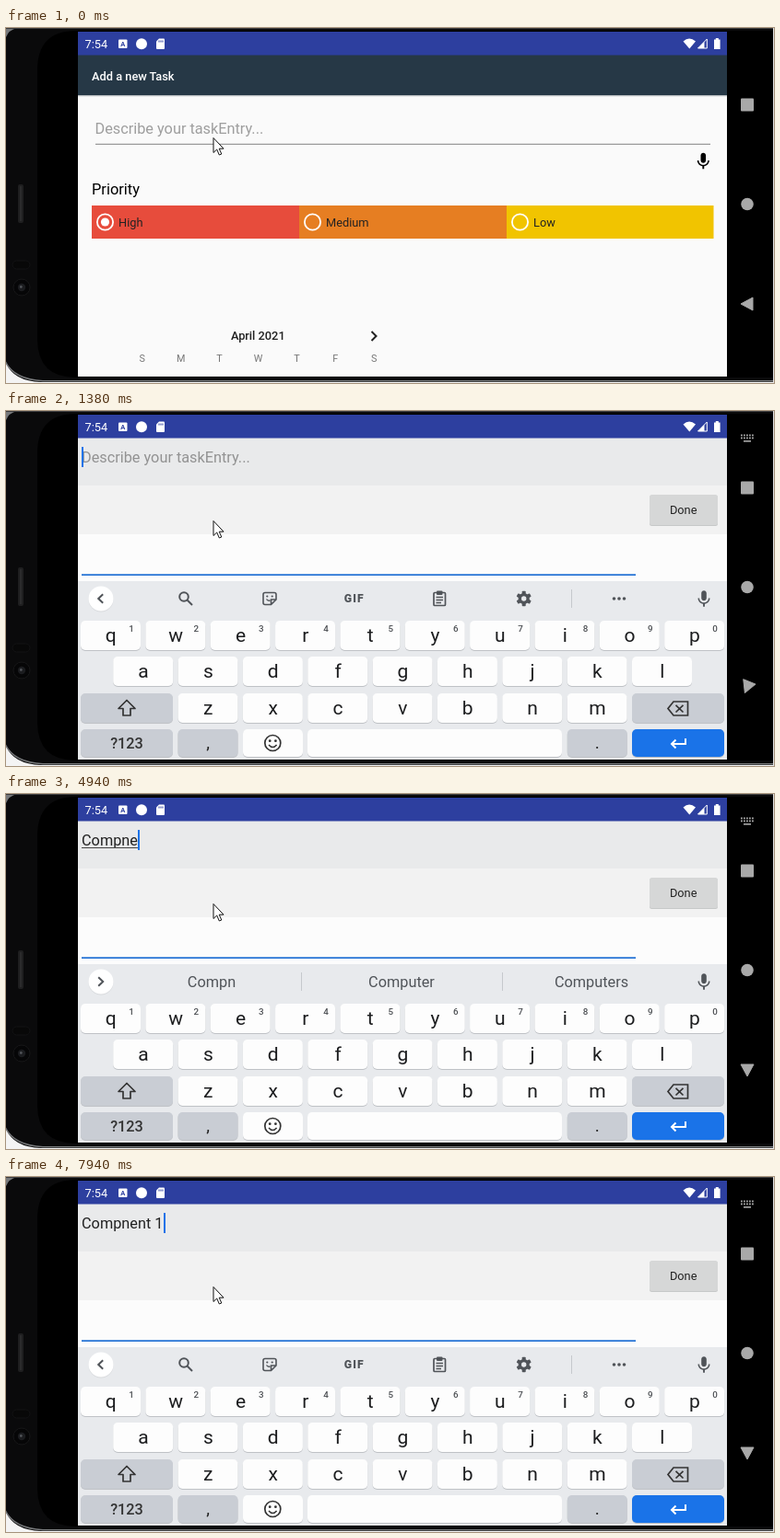
An HTML page that plays this animation: 833x386 px, repeating every 8 s.

```html
<!DOCTYPE html>
<html lang="en">
<head>
<meta charset="utf-8">
<title>Add a new Task</title>
<style>
html, body { margin: 0; width: 100%; height: 100%; overflow: hidden; background: #000; }
svg { display: block; width: 833px; height: 386px; font-family: Roboto, sans-serif; }
text { white-space: pre; }
.mid { text-anchor: middle; }
.line { fill: none; stroke-width: 2; }
</style>
</head>
<body>
<svg id="stage" viewBox="0 0 833 386"></svg>
<script>
const LOOP = 8000, BLUE = '#1a73e8', INK = '#505459';

const rect = (x, y, w, h, fill, more = '') =>
  `<rect x="${x}" y="${y}" width="${w}" height="${h}" fill="${fill}" ${more}/>`;
const circle = (x, y, r, fill, more = '') =>
  `<circle cx="${x}" cy="${y}" r="${r}" fill="${fill}" ${more}/>`;
const text = (x, y, size, fill, str, more = '') =>
  `<text x="${x}" y="${y}" font-size="${size}" fill="${fill}" ${more}>${str}</text>`;
const centred = (x, y, size, fill, str, more = '') =>
  text(x, y, size, fill, str, 'class="mid" ' + more);
const path = (d, fill, more = '') => `<path d="${d}" fill="${fill}" ${more}/>`;
const line = (d, stroke, more = '') => `<path d="${d}" class="line" stroke="${stroke}" ${more}/>`;
const group = (id, body, more = '') => `<g id="${id}" ${more}>${body}</g>`;

const mic = (x, y, fill) => path(
  'M12 14c1.66 0 3-1.34 3-3V5c0-1.66-1.34-3-3-3S9 3.34 9 5v6c0 1.66 1.34 3 3 3z' +
  'm5.3-3c0 3-2.54 5.1-5.3 5.1S6.7 14 6.7 11H5c0 3.41 2.72 6.23 6 6.72V21h2v-3.28c3.28-.48 6-3.3 6-6.72z',
  fill, `transform="translate(${x} ${y}) scale(.93) translate(-12 -11.5)"`);

function phone() {
  return rect(0, 0, 833, 386, '#0a0a0b') +
    path('M833 3H76Q34 3 34 46V338Q34 380 76 380H833Z', '#000') +
    path('M0 0H12Q3 2 0 10Z', '#77797b') +
    path('M0 364Q8 384 38 385H833V386H0Z', '#f4f4f4') +
    line('M-1 362Q8 382 40 383.7H833', '#77797b', 'style="stroke-width:1.4"') +
    rect(0, 0, 833, 1, '#3c3c3e') + rect(832, 0, 1, 386, '#e4e4e4') +
    rect(13, 170, 6, 42, '#1f1f20', 'rx="2"') + rect(15, 172, 2, 38, '#2b2b2c') +
    rect(7, 253, 19, 9, '#080808', 'rx="4.5" stroke="#131314"') +
    circle(17, 282, 9, '#060607', 'stroke="#171718"') +
    circle(17, 282, 4.2, '#1b1c1f') + circle(16.3, 281.5, 1.4, '#505358');
}

function navBar() {
  const grey = '#a9a9a9';
  let dots = rect(800, 32, 8, 1.6, grey);
  for (let i = 0; i < 10; i++) dots += rect(797 + i % 5 * 3, 25.5 + (i > 4) * 3, 1.8, 1.8, grey);
  return group('imeIcon', dots) + rect(797, 76.5, 14, 14, grey, 'rx="1"') +
    circle(804, 191.5, 6.8, grey) +
    path('M-7 0L6 -7V7Z', grey, `id="back" stroke="${grey}" stroke-linejoin="round"`);
}

function statusBar() {
  return rect(78, 4, 704, 25.5, '#2d3f9f') +
    text(85.5, 22, 12.8, '#fff', '7:54') +
    rect(122, 12.5, 9.5, 9.5, '#fff', 'rx="1"') +
    centred(126.7, 20, 7.5, '#2d3f9f', 'A', 'font-weight="700"') +
    circle(147, 17.3, 6, '#fff') +
    path('M166 11.5H171Q172 11.5 172 12.5V22Q172 23 171 23H164Q163 23 163 22V14.5Z', '#fff') +
    path('M165.5 13.5h1v2h-1zm2 0h1v2h-1zm2 0h1v2h-1z', '#2d3f9f') +
    path('M734.5 14.5Q741 8.5 748 14.5L741.3 22.5Z', '#fff') +
    path('M760.3 12V22H750.5Z', 'none', 'stroke="#fff"') + path('M757.5 15V22H750.5Z', '#fff') +
    path('M768 12.5h1.8v-1.5h3v1.5h1.8v10.5h-6.6z', '#fff');
}

function form() {
  let s = rect(78, 73, 704, 306, '#fafafa') + rect(78, 29, 704, 44, '#263846') +
    rect(78, 73, 704, 1, '#b9bdc0') + rect(78, 74, 704, 1, '#e6e7e8') +
    text(93, 56.5, 12.8, '#fff', 'Add a new Task', 'font-weight="500"') +
    text(96.5, 115, 16.3, '#9e9e9e', 'Describe your taskEntry...') +
    rect(97, 125.8, 667, 1, '#828282') +
    group('focus', rect(97, 125, 667, 2, BLUE) + rect(96.5, 98, 1.8, 21, BLUE)) +
    mic(756.3, 144.5, '#000') + text(93, 181, 16.4, '#000', 'Priority');
  [['High', '#e74c3c'], ['Medium', '#e67e22'], ['Low', '#f1c400']].forEach(([name, fill], i) => {
    const x = 93 + 225 * i;
    s += rect(x, 193, i > 1 ? 224.5 : 225, 36, fill) +
      circle(x + 14.5, 211, 8.6, 'none', 'stroke="#fff" stroke-width="1.8"') +
      (i ? '' : circle(x + 14.5, 211, 4.6, '#fff')) +
      text(x + 29, 215.7, 12.8, '#222', name);
  });
  s += centred(273.3, 339.3, 12.8, '#212121', 'April 2021', 'font-weight="500"') +
    line('M396.5 330L401.5 335L396.5 340', '#222');
  [...'SMTWTFS'].forEach((d, i) => s += centred(147.8 + 41.9 * i, 363, 10.8, '#777', d));
  return s;
}

function editor() {
  return rect(78, 29, 704, 350, '#fcfcfc') +
    rect(78, 29, 704, 1, '#f2f2f2', 'id="middle"') +
    rect(78, 29, 704, 1, '#e9eaeb', 'id="top"') +
    group('done', rect(698, -15.5, 74, 33, '#c6c8c8', 'rx="2.5"') +
      rect(698, -16.5, 74, 33, '#d6d7d7', 'rx="2.5"') + centred(734.7, 4.5, 12.8, '#222', 'Done')) +
    rect(82, 0, 601, 1.7, '#2070d4', 'id="rule"') +
    text(82, 56, 16.3, '#929292', 'Describe your taskEntry...', 'id="hint"') +
    text(82, 56, 16.3, '#222', '', 'id="entry"') +
    rect(82, 58, 0, 1, '#444', 'id="under"') + rect(82, 39, 2, 22, BLUE, 'id="caret"');
}

function toolbar() {
  let teeth = '';
  for (let a = 0; a < 360; a += 60)
    teeth += rect(-2, -8.2, 4, 4, INK, `rx=".8" transform="rotate(${a})"`);
  const dots = [659.5, 665, 670.5].map(x => circle(x, 204, 1.8, INK)).join('');
  return circle(193, 202, 4.8, 'none', `stroke="${INK}" stroke-width="2"`) +
    line('M196.5 205.5L202 211', INK) +
    line('M281 197.5H291Q293 197.5 293 199.5V205L287.5 210.5H281Q279 210.5 279 208.5V199.5Q279 197.5 281 197.5Z' +
      'M287.5 210V205H293', INK, 'style="stroke-width:1.6"') +
    circle(283.3, 201.5, 1.1, INK) + circle(288.7, 201.5, 1.1, INK) +
    line('M282.5 204.5Q284 207 286.5 206', INK, 'style="stroke-width:1.4"') +
    centred(377.8, 208.3, 12.2, INK, 'GIF', 'font-weight="900" letter-spacing="1.2"') +
    rect(464, 197.5, 12.5, 14, 'none', `rx="1" stroke="${INK}" stroke-width="1.7"`) +
    rect(467, 195.5, 6.5, 4.5, INK, 'rx="1"') +
    line('M466.5 202.5H474M466.5 205.5H474M466.5 208.5H472', INK, 'style="stroke-width:1.4"') +
    `<g transform="translate(561.7 204)">${teeth}${circle(0, 0, 4.4, 'none', `stroke="${INK}" stroke-width="3.4"`)}</g>` +
    rect(613, 194, 1, 20, '#c6c9cd') + dots;
}

function keyboard() {
  const pitch = 70.35;
  const key = (x, y, w, fill = '#fdfdfd', h = 32) =>
    rect(x, y + 1, w, h, '#bfc2c6', 'rx="5"') + rect(x, y, w, h, fill, 'rx="5"');
  let s = rect(78, 185, 704, 194, '#e8eaed');
  [['qwertyuiop', 81, 228], ['asdfghjkl', 116.2, 267], ['zxcvbnm', 186.5, 307]].forEach(([row, x0, y]) =>
    [...row].forEach((ch, i) => {
      const x = x0 + pitch * i;
      s += key(x, y, 65) + centred(x + 32.8, y + 23, 21, '#1c1d1f', ch);
      if (y === 228) s += centred(x + 55, 239.5, 9.8, '#4c4f53', (i + 1) % 10, 'font-weight="500"');
    }));
  const grey = '#c9cdd4';
  return s + key(81, 307, 100, grey) + key(679, 307, 100, grey) +
    key(81, 346, 100, grey, 30) + key(186.5, 346, 65, grey, 30) + key(257, 346, 65, '#fdfdfd', 30) +
    key(327, 346, 276, '#fdfdfd', 30) + key(608.8, 346, 65, grey, 30) + key(679, 346, 100, BLUE, 30) +
    line('M131 314.5L122 323.5H127V331H135V323.5H140Z', '#333', 'style="stroke-width:1.7" stroke-linejoin="round"') +
    line('M724 316H739.5V331H724L718 323.5ZM726.5 319.8L734.5 327.5M734.5 319.8L726.5 327.5', '#333', 'style="stroke-width:1.7"') +
    centred(131, 367, 16.3, '#333', '?123', 'font-weight="500"') +
    centred(219, 367, 19, '#222', ',') + centred(641.3, 367, 19, '#222', '.') +
    circle(289.3, 361, 8.5, 'none', 'stroke="#333" stroke-width="1.7"') +
    circle(286.2, 358.7, 1.4, '#333') + circle(292.4, 358.7, 1.4, '#333') +
    line('M285 363Q289.3 368 293.6 363', '#333', 'style="stroke-width:1.6"') +
    line('M737 356V362H722M726.5 357.5L722 362L726.5 366.5', '#fff') +
    circle(103, 205, 13.5, '#d8dadd') + circle(103, 204, 13.5, '#fff') +
    line('M2.5 -4.8L-2.5 0L2.5 4.8', INK, 'id="chevron"') +
    mic(757, 204, INK) + group('tools', toolbar()) + group('words', '');
}

const pointer = path('M225 119.5V135.5L228.7 132L231.3 138L233.8 137L231.2 131.2H236Z', '#fff', 'stroke="#111"');

const $ = id => document.getElementById(id);
$('stage').innerHTML = phone() + navBar() + form() + group('editor', editor()) +
  group('keys', keyboard()) + statusBar() + pointer;

// Start time, entered text, caret shown, word suggestions
const c = ['C', 'Can', 'Call'], com = ['Com', 'Come', 'Coming'], comp = ['Comp', 'Company', 'Complete'];
const comput = ['Compn', 'Computer', 'Computers'], part = ['Compne', 'Component', 'Components'];
const one = ['Compnent1'], next = ['and', 'is', 'the'];
const steps = [
  [0, '', 1], [1530, '', 0], [2060, '', 1], [2590, '', 0], [3020, '', 1], [3480, '', 0],
  [3760, 'C', 1], [3910, 'C', 1, c], [4060, 'Co', 1, c], [4210, 'Com', 1, c], [4370, 'Com', 1, com],
  [4520, 'Comp', 1, com], [4670, 'Comp', 1, comp], [4820, 'Compn', 1, comp], [4940, 'Compne', 1, comput],
  [5090, 'Compne', 1, part], [5300, 'Compnen', 1, part], [5500, 'Compnent', 1, part],
  [5720, 'Compnent', 1, ['Compnent']], [5870, 'Compnent1', 1, ['Compnent']], [6020, 'Compnent1', 1, one],
  [6270, 'Compnent1', 0, one], [6550, 'Compnent1', 1, one], [6700, 'Compnent', 1, one],
  [6980, 'Compnent\u00a0', 1, one], [7130, 'Compnent\u00a0', 1, next], [7410, 'Compnent\u00a0', 0, next],
  [7660, 'Compnent\u00a01', 1, next], [7940, 'Compnent\u00a01', 1]
];

const set = (id, attrs) => { for (const k in attrs) $(id).setAttribute(k, attrs[k]); };
const show = (id, on) => set(id, { visibility: on ? 'visible' : 'hidden' });

function suggestions(words) {
  if (words.length === 1) return centred(429, 210, 16.3, INK, words[0]);
  return words.map((w, i) => centred(223 + 206 * i, 210, 16.3, INK, w)).join('') +
    rect(320, 194, 1, 20, '#c6c9cd') + rect(538, 194, 1, 20, '#c6c9cd');
}

function render(t) {
  const [, entry, caret, words] = steps.findLast(s => s[0] <= t);
  const h = t < 1380 ? 349 : 155;
  const turn = t < 1380 ? 0 : t < 1530 ? -68 : -90;

  show('focus', t >= 870);
  set('editor', { opacity: t < 990 ? 0 : t < 1110 ? 0.35 : t < 1230 ? 0.75 : 1 });
  show('imeIcon', t >= 990);
  set('back', { transform: `translate(804 300) rotate(${turn})` });
  set('keys', { display: t < 1380 ? 'none' : 'inline' });

  set('top', { height: Math.round(1 + h * 0.33) });
  set('middle', { height: Math.round(1 + h * 0.67) });
  set('done', { transform: `translate(0 ${30 + h / 2})` });
  set('rule', { y: 22.3 + h });

  $('entry').textContent = entry;
  const width = entry ? $('entry').getComputedTextLength() : 0;
  set('hint', { display: entry ? 'none' : 'inline' });
  set('under', { width: entry.includes('\u00a0') ? 0 : width });
  set('caret', { x: Math.ceil(82 + width), opacity: caret });

  set('tools', { display: words ? 'none' : 'inline' });
  set('chevron', { transform: `translate(102.7 204) scale(${words ? -1 : 1} 1)` });
  $('words').innerHTML = words ? suggestions(words) : '';
}

const start = performance.now();
function tick() {
  render((performance.now() - start) % LOOP);
  requestAnimationFrame(tick);
}
tick();
</script>
</body>
</html>
```
